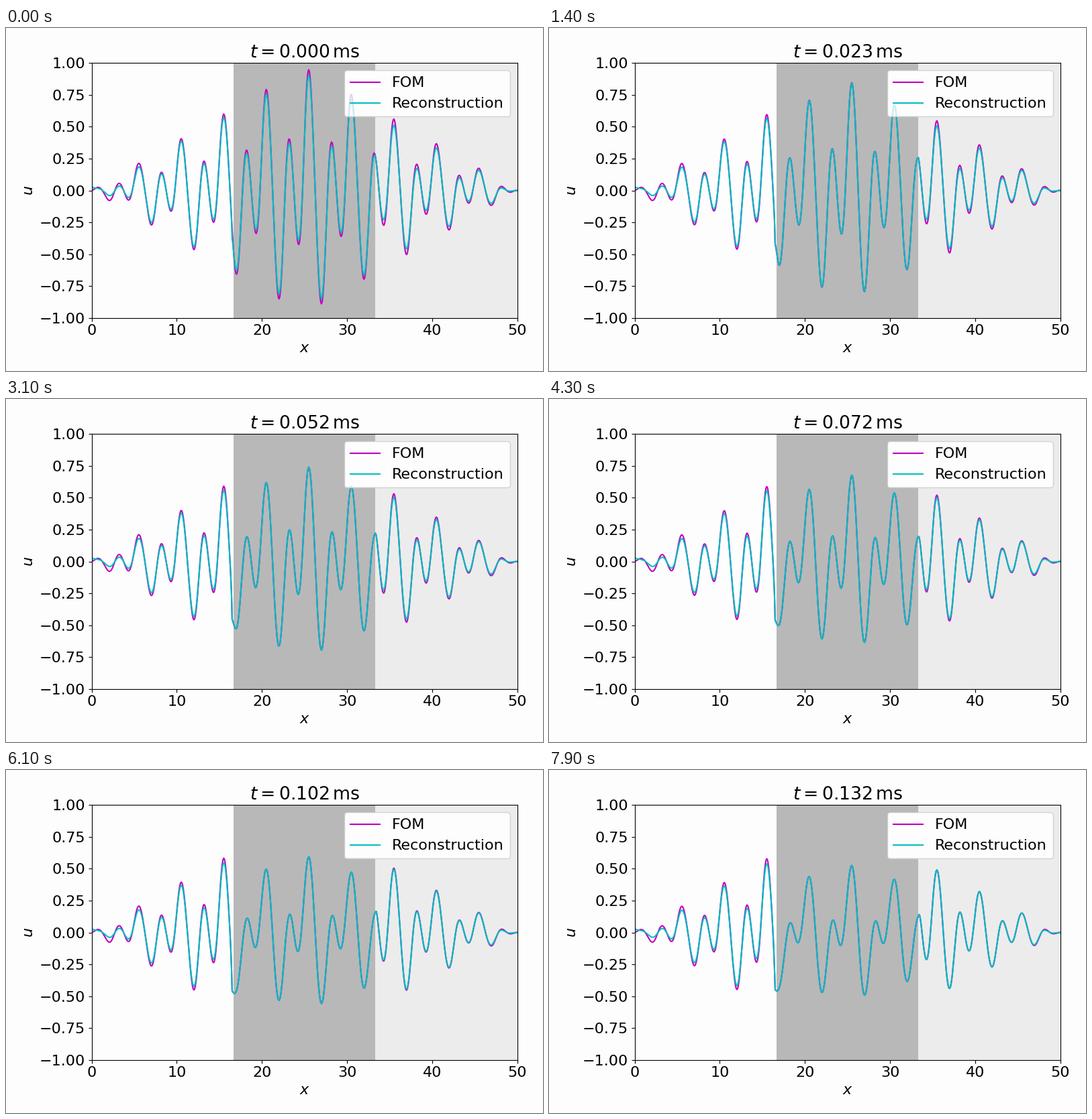
Animation of 800x512 px, one loop 8000 ms. Source, as a matplotlib script:

```python
import numpy as np
import matplotlib.pyplot as plt
from matplotlib.animation import FuncAnimation
from matplotlib.patches import Rectangle

W, H, DPI = 800, 512, 100
FRAMES, INTERVAL = 80, 100
DT = 1 / 600
LENGTH, CELLS = 50.0, 600
PAPER = "#fdfdfd"

plt.rcParams.update({
    "font.family": "DejaVu Sans", "font.size": 16,
    "figure.facecolor": PAPER, "axes.facecolor": PAPER,
})

x = np.linspace(0, LENGTH, CELLS + 1)
dx = x[1] - x[0]


def start(x):
    """A few harmonics under a triangular envelope."""
    w = 2 * np.pi * x / 5
    wave = (0.386 * np.cos(w) + 0.68 * np.sin(2 * w)
            + 0.03 * np.cos(3 * w) + 0.03 * np.sin(4 * w))
    return (1 - np.abs(x / 25 - 1)) * wave


# Heat equation with one diffusivity per zone, ends held at zero
face = np.repeat([0.055, 1.0, 0.21], [198, 202, 200]) / dx**2
stiff = (np.diag(face[:-1] + face[1:])
         - np.diag(face[1:-1], 1) - np.diag(face[1:-1], -1))
rates, modes = np.linalg.eigh(stiff)
coef = modes.T @ start(x[1:-1])


def full_model(t):
    u = np.zeros_like(x)
    u[1:-1] = modes @ (np.exp(-rates * t) * coef)
    return u


def step_at(center, width=0.15):
    return (1 + np.tanh((x - center) / width)) / 2


into_mid, into_right = step_at(16.1), step_at(33.8)
end_damp = 1 - 0.6 * (np.exp(-(x / 4)**2) + np.exp(-((LENGTH - x) / 2)**2))
end_lift = 0.03 * np.exp(-2 * x)


def reconstruction(t):
    """Smoother than the full model: each zone runs ahead in time."""
    left = full_model(0.18 + 1.6 * t)
    mid = full_model(t + 0.01 * np.exp(-t / 0.01))
    right = full_model(0.09 + 0.3 * t)
    u = left + into_mid * (mid - left) + into_right * (right - mid)
    return u * end_damp + end_lift


def caption(t):
    return rf"$t = {t:.3f}\,\mathrm{{ms}}$"


fig, ax = plt.subplots(figsize=(W / DPI, H / DPI), dpi=DPI)
ax.axvspan(LENGTH / 3, 2 * LENGTH / 3, color="#b8b8b8", lw=0)
ax.axvspan(2 * LENGTH / 3, LENGTH, color="#ececec", lw=0)
fom, = ax.plot([], [], "m", lw=1.5, label="FOM")
rec, = ax.plot([], [], "c", lw=1.5, label="Reconstruction")
ax.set(xlim=(0, LENGTH), ylim=(-1, 1), xlabel="$x$", ylabel="$u$")
title = ax.set_title(caption(0))
legend = ax.legend(loc="upper right")
fig.tight_layout()

# Paper behind the legend hides the zones but not the curves
fig.canvas.draw()
box = legend.get_window_extent()
ax.add_patch(Rectangle((box.x0 + 1, box.y0 + 1), box.width - 2, box.height - 2,
                       transform=None, color=PAPER, lw=0, zorder=1.5))


def draw(step):
    t = step * DT
    fom.set_data(x, full_model(t))
    rec.set_data(x, reconstruction(t))
    title.set_text(caption(t))
    return fom, rec, title


anim = FuncAnimation(fig, draw, frames=FRAMES, interval=INTERVAL,
                     repeat=True, repeat_delay=0)
plt.show()
```
